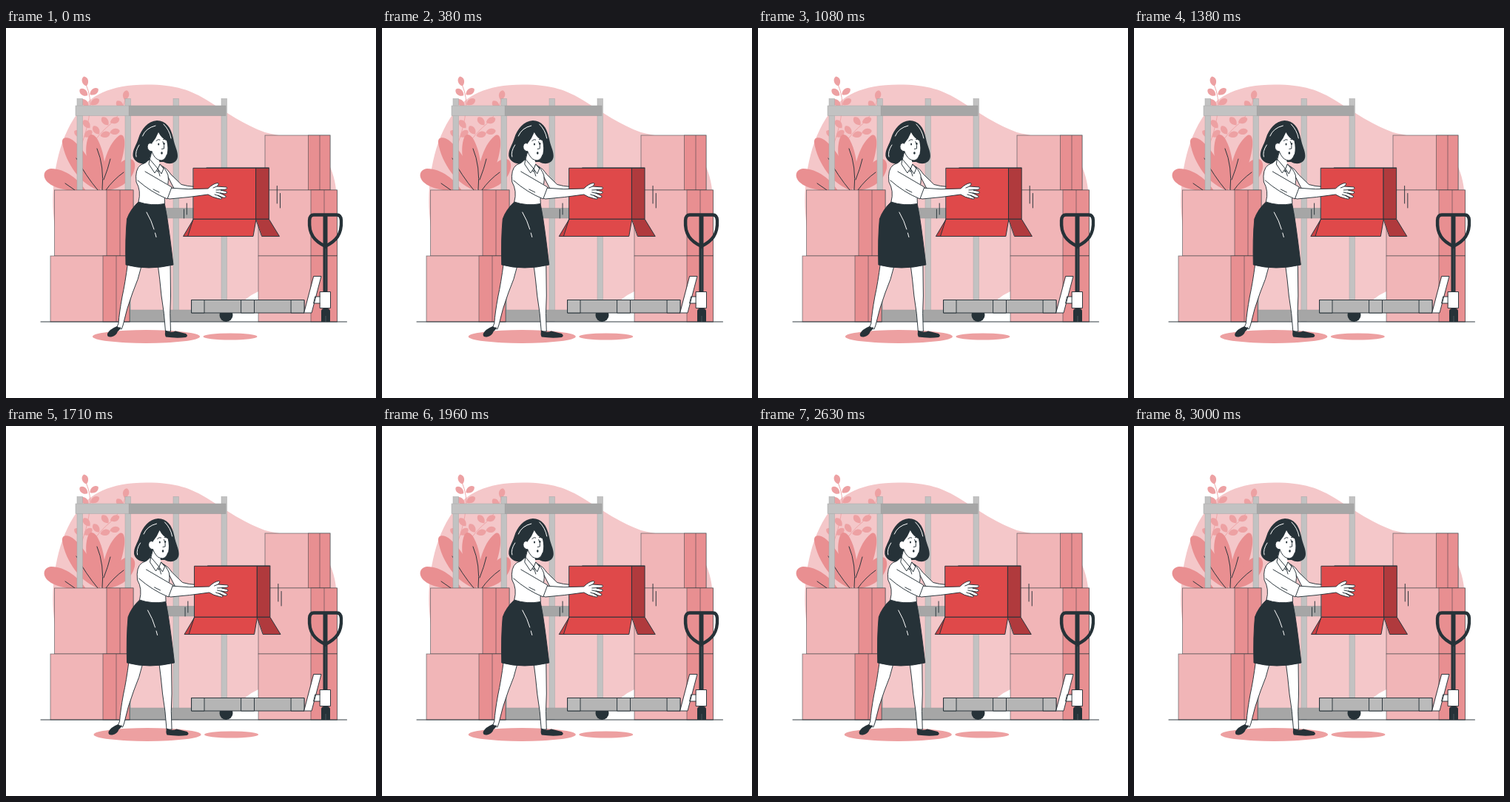
Animation of 500 by 500 pixels, one loop 3.04 s. Source, as an HTML page:

```html
<!DOCTYPE html>
<html lang="en">
<head>
<meta charset="utf-8">
<title>Carrying a box</title>
<style>
html, body { margin: 0; width: 100%; height: 100%; overflow: hidden; background: #fff; }
svg { display: block; width: 100vw; height: 100vh; }
.crate { stroke: #263238; stroke-opacity: .6; stroke-width: .8; }
.front { fill: #f1b5b7; }
.side { fill: #e88f91; }
.post { fill: #c2c2c2; stroke: #a8a8a8; stroke-width: .5; }
.bar { fill: #a6a6a6; stroke: #969696; stroke-width: .5; }
.ink { fill: none; stroke: #263238; stroke-width: .95; stroke-linecap: round; stroke-linejoin: round; }
.white { fill: #fff; }
.dark { fill: #263238; }
.shine { fill: none; stroke: #fff; stroke-width: 1; stroke-linecap: round; }
</style>
</head>
<body>
<svg viewBox="0 0 500 500" xmlns="http://www.w3.org/2000/svg">
  <path fill="#f4c7c9" d="M64 250C61 205 70 152 96 116C112 92 140 76.500 190 76.500C230 76.500 250 84 274 99C298 114 322 131 350 141C370 146 388 147 404 153C432 165 447 195 447 235C447 300 400 330 341 356Q323 364 310 381H110C80 345 68 300 64 250Z"/>

  <g id="sprigs" fill="#eda1a3" stroke="#eda1a3"></g>

  <g fill="#e98f91">
    <path d="M108 220C92 222 67 218 57 209C48 201 51 191 61 190C80 190 99 205 108 220Z"/>
    <path d="M128 220C102 214 80 182 76 155C75 146 85 147 92 153C111 170 125 198 128 220Z"/>
    <path d="M131 220C110 202 104 166 111 148C114 141 120 144 124 151C135 172 136 200 131 220Z"/>
    <path d="M130 220C127 192 136 159 152 146C159 141 161 150 160 160C157 185 147 207 130 220Z"/>
    <path d="M132 220C137 202 151 180 164 177C174 175 176 185 173 193C168 209 151 219 132 220Z"/>
  </g>
  <path class="ink" d="M80 210L93 219M95 176Q108 200 124 219M123 163Q133 187 130 219M141 177Q138 190 132 205M159 195Q145 205 135 219"/>

  <g id="rack"></g>
  <g id="crates" class="crate"></g>
  <path class="ink" d="M47 397H460.500" stroke-linecap="butt"/>

  <g id="jack">
    <circle class="dark" cx="297.500" cy="388" r="9"/>
    <path class="ink" style="fill:#b5b5b5" d="M251 367.500H403V385H251Z"/>
    <path class="ink" style="fill:#bbb" d="M251 367.500H268V385H251ZM318 367.500H335.500V385H318ZM385.500 367.500H403V385H385.500Z"/>
    <path class="ink" style="fill:#fff" d="M416 335.500H426L413 385H403ZM418 363H426V372H416Z"/>
    <path class="dark" d="M428.500 252H434.500V358H428.500ZM426 397V383Q426 379 430 379H434Q438 379 438 383V397Z"/>
    <path d="M432 298V355M432 389V397" stroke="#566268" stroke-width=".7"/>
    <path fill="none" stroke="#263238" stroke-width="4.300" stroke-linejoin="round" d="M416 252.500H447Q452.500 252.500 453 260C454 279 446 288 431.500 295C417 288 409 279 410 260Q410.500 252.500 416 252.500Z"/>
    <path class="ink" style="fill:#fff" d="M424.500 356.500H438.500V378.500H424.500Z"/>
  </g>

  <g id="carrier">
    <g fill="#eda0a1">
      <ellipse cx="189.500" cy="417" rx="72.500" ry="9"/>
      <ellipse cx="303" cy="417" rx="36.500" ry="4.500"/>
    </g>

    <path class="ink" style="fill:#fff" d="M212 187Q218 190 223 198L237 211.500Q245 214 256 214.500V222L230 222Z"/>

    <path class="ink" style="fill:#fff" d="M164.500 318Q161 345 157 363Q153 385 152 399L150 404L156 407L158 402Q163 379 171 358Q179 340 183.500 320Z"/>
    <path class="ink" style="fill:#fff" d="M205 318Q208 340 210 362Q214 385 215.500 410L222.500 410Q221 385 222.500 362L222 318Z"/>
    <path class="dark" d="M150 403Q140 407 137 413Q136 418 142 417.500Q149 416 151 410Q155 407 155 404Q152 406 150 403ZM215.500 408.500Q214 414 216 417.500Q230 419.500 243 418Q247 416 243 413Q236 411 229 409.500Q223 412.500 215.500 408.500Z"/>

    <path class="ink dark" style="fill:#263238" d="M180 234Q168 245 163.500 258Q161 285 162 320Q192 328 226 320Q222 285 218 258Q216 246 214 236Q196 240 180 234Z"/>
    <path class="shine" d="M190 249Q197 261 200 272M201.500 277L203 282.500"/>

    <path class="dark" d="M204 125C192 126 183 136 179 149C176 159 171 164 171.500 173C174 183 186 186 197 181L213 181C222 186 232 182 232 173C232 165 228 160 226 149C223 134 216 125 204 125Z"/>
    <path class="white" d="M194 177L197 167Q191 166 191 160Q192 154 197 156Q203 149 206 141Q210 149 217 152Q219.500 162 217.500 171Q214 181 207 178.500L208 188L204 196L194 185Z"/>
    <path class="ink" d="M197 167Q191 166 191 160Q192 154 197 156M197 167L194 179M197 167Q201 177 207 178.500Q214 181 217.500 171"/>
    <path class="ink" d="M203 152.500Q205.500 149.500 208 151M212.500 150.500Q214.500 149.500 216.500 151.500M212 153.500Q214.500 159 213.500 163L210.500 163.500"/>
    <g class="dark">
      <ellipse cx="206.200" cy="157" rx="1" ry="1.500"/>
      <ellipse cx="213.800" cy="156.500" rx=".9" ry="1.400"/>
      <ellipse cx="210.500" cy="169" rx="1.300" ry="1.800"/>
    </g>
    <path class="shine" d="M202 132Q189 135 184.500 146M180 158Q174 167 176 174M213 130Q221 138 223 149"/>

    <path class="ink" style="fill:#fff" d="M193 178Q189 183 182 185Q174 191 176 208Q183 220 179 235Q196 241 214.500 237.500L214 222Q221 212 219 199Q216 190 208 184L205 194Z"/>
    <path class="ink" style="fill:#fff" d="M194 177.500L193 184L201 196L205 190L210 197L213 190L208 184L205.500 190Z"/>
    <path class="ink" d="M206 193L208 200"/>

    <g class="ink">
      <path style="fill:#df494a" d="M253.300 189.300H338V258.300H253.300Z"/>
      <path style="fill:#b03a3d" d="M338 189.300H355.300V258.300H338Z"/>
      <path style="fill:#c94144" d="M253.300 258.300L239.500 281.500H248Z"/>
      <path style="fill:#df494a" d="M253.300 258.300H338L334 281.500H246Z"/>
      <path style="fill:#b03a3d" d="M338 258.300H355.300L369.500 281.500H346Z"/>
      <path d="M271 189H355.300" stroke-width="1.200"/>
      <path d="M240.500 245V257M244.300 237V252M366.300 213.500V237M370.500 223.500V243"/>
    </g>

    <path class="ink" style="fill:#fff" d="M220 216Q246 219 273 217Q280 210 286 209.500Q289 210 285 214L298 215Q300 217 297 218L290 219L298 221Q300 223 296 224L289 223L297 227Q298 230 293 229L286 226L292 230Q291 232 287 230.500Q279 229 273 225Q247 229 221 231Q212 229 206 222Z"/>
    <path class="ink" d="M280 216L285 214M284 219L292 218.500M284 222L291 223.500M282 225L288 227"/>
    <path class="white" d="M178 195Q184 187 193 194L224 215L218 231Q197 225 179 208Z"/>
    <path class="ink" d="M188 194L224 215Q221 223 218 231Q196 222 178 206M199 218L207 222"/>
  </g>
</svg>
<script>
const byId = id => document.getElementById(id);
const rect = (cls, x, y, w, h) => `<rect class="${cls}" x="${x}" y="${y}" width="${w}" height="${h}"/>`;
const crate = (x, y, w, h, fold, seam) =>
  rect('front', x, y, w, h) + rect('side', fold, y, x + w - fold, h) + `<path d="M${seam} ${y}v${h}"/>`;
// A leaf centred on (x, y), pointing up before rotation.
const leaf = (x, y, angle, size = .85) =>
  `<path stroke="none" transform="translate(${x} ${y}) rotate(${angle}) scale(${size})" d="M0 8C-7 3 -6 -6 0 -8C6 -6 7 3 0 8Z"/>`;

byId('sprigs').innerHTML =
  '<path fill="none" stroke-width=".9" d="M108 76Q116 95 113 112Q112 130 102 158M162 93Q158 114 142 129Q126 142 113 162"/>' +
  [[107, 72, -15], [119, 86, 55], [105, 87, -50], [120, 100, 60], [106, 101, -55],
   [109, 130, -40], [98, 143, -55], [111, 143, 50],
   [162, 91, 12], [154, 104, -40], [147, 125, 65], [134, 126, -40],
   [147, 140, 80], [122, 138, -35], [134, 144, 75]].map(l => leaf(...l)).join('');

byId('rack').innerHTML =
  [96, 161, 226, 291].map(x => rect('post', x, 95.5, 7.5, 301)).join('') +
  rect('bar', 166, 105, 131, 13.5) + rect('post', 94, 105, 72, 13.5) +
  rect('bar', 166, 243.5, 125, 13.5) + rect('bar', 166, 381, 131, 15.5);

byId('crates').innerHTML =
  crate(65.5, 219, 106.5, 89, 136, 154) + crate(60, 308, 107, 89, 131, 149) +
  crate(350, 145, 88, 74, 408.5, 424) +
  crate(341, 219, 106.5, 89, 412, 430) + crate(341, 308, 106.5, 89, 412, 430);

// Horizontal shake: one offset per tenth of the cycle, linear in between.
const shake = [0, -1, 2, -4, 4, -4, 4, -4, 2, -1, 0];
const LOOP = 3040, CYCLE = 3000, FPS = 24;
const carrier = byId('carrier');

function draw(ms) {
  const step = Math.floor((ms % LOOP + 5) * FPS / 1000);
  const p = Math.min(step / FPS * 1000 / CYCLE, 1) * 10;
  const i = Math.min(Math.floor(p), 9);
  const x = shake[i] + (shake[i + 1] - shake[i]) * (p - i);
  carrier.setAttribute('transform', `translate(${x.toFixed(3)} 0)`);
}

const start = performance.now();
function tick() {
  draw(performance.now() - start);
  requestAnimationFrame(tick);
}
tick();
</script>
</body>
</html>
```
